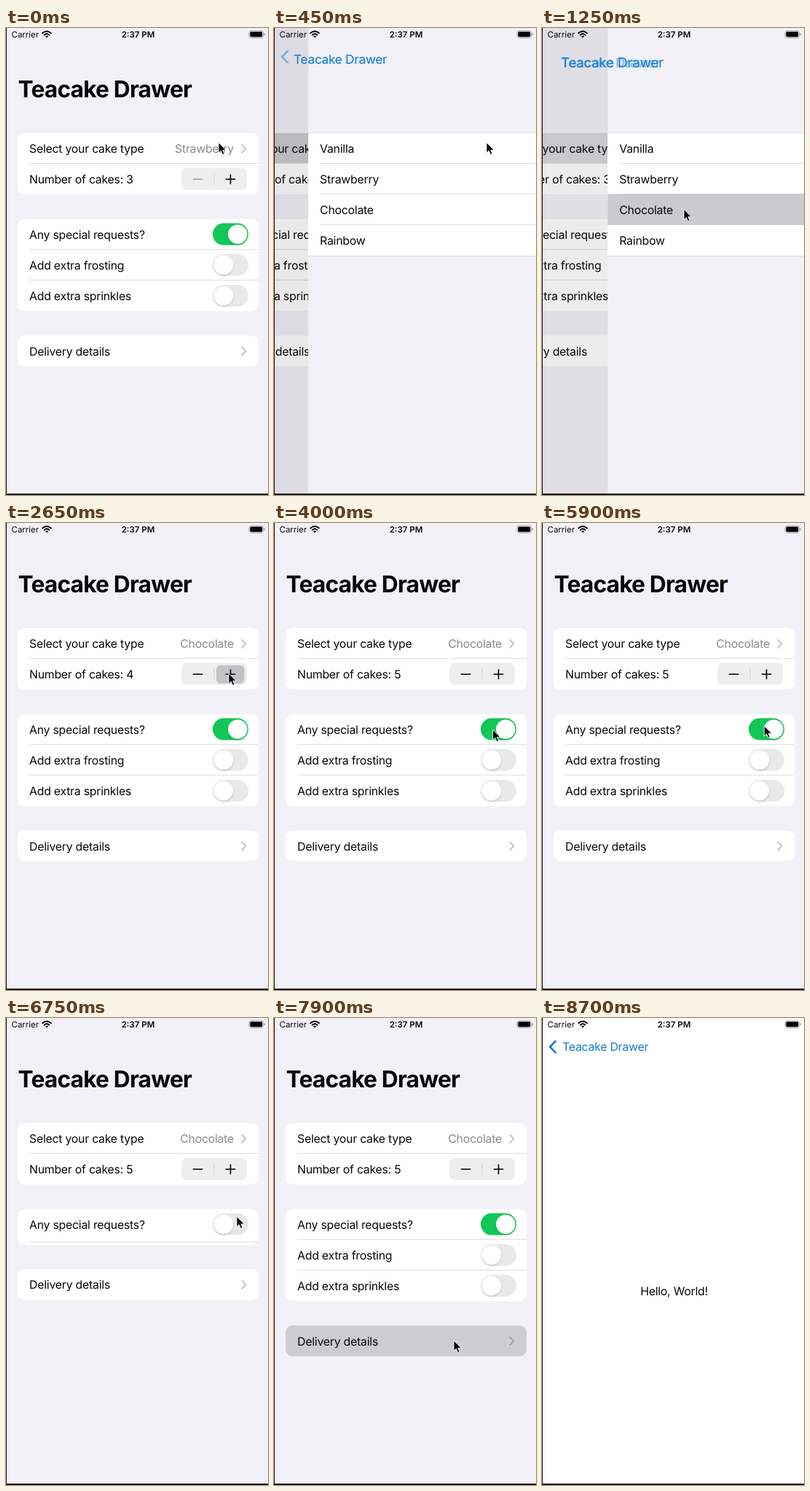
Animation of 360 by 640 pixels, one loop 9.75 s. Source, as an HTML page:

```html
<!DOCTYPE html>
<html lang="en">
<head>
<meta charset="utf-8">
<title>Order form</title>
<style>
  html, body { margin: 0; width: 100%; height: 100%; overflow: hidden; background: #f2f1f7; }
  svg { display: block; width: 360px; height: 640px; }
  text { font: 15.8px Inter, "Liberation Sans", sans-serif; letter-spacing: -.014em; fill: #080808; text-rendering: geometricPrecision; }
  .end { text-anchor: end; fill: #8a8a8e; }
  .mid { text-anchor: middle; }
  .small { font-size: 11.5px; letter-spacing: 0; }
  .clock { font-weight: 600; }
  .blue { fill: #127cd6; }
  .large { font-size: 31.7px; font-weight: 700; letter-spacing: -.025em; }
  .line { stroke: #dfdfe2; }
  .stroke { fill: none; stroke-linecap: round; stroke-linejoin: round; }
</style>
</head>
<body>
<svg id="stage" viewBox="0 0 360 640">
  <defs>
    <clipPath id="card"><rect id="cardClip" x="16" y="304" width="331"/></clipPath>
    <filter id="soft" x="-30%" y="-30%" width="160%" height="170%">
      <feDropShadow dx="0" dy="1.5" stdDeviation="1.3" flood-opacity=".18"/>
    </filter>
  </defs>
  <g id="form"></g>
  <rect id="dim" width="360" height="640"/>
  <g id="list"></g>
  <g id="detail"></g>
  <g id="nav"></g>
  <g id="status"></g>
  <path id="cursor" d="M0 0V14.2L3.3 11.2 5.6 16.5 8 15.5 5.8 10.3H10.4Z" fill="#000" stroke="#fff" stroke-width=".9"/>
</svg>
<script>
const LOOP = 9750, ROW = 42, TITLE = "Teacake Drawer";
const $ = id => document.getElementById(id);
const clamp = v => Math.max(0, Math.min(1, v));
const mix = (a, b, p) => a + (b - a) * p;
const smooth = p => (p = clamp(p), p * p * (3 - 2 * p));
const blend = (from, to, p) => `rgb(${from.map((c, i) => Math.round(mix(c, to[i], p)))})`;

function el(parent, tag, attrs, content) {
  const node = document.createElementNS("http://www.w3.org/2000/svg", tag);
  set(node, attrs);
  if (content) node.textContent = content;
  return parent.appendChild(node);
}
function set(node, attrs) {
  for (const key in attrs) node.setAttribute(key, attrs[key]);
}
const group = (parent, attrs = {}) => el(parent, "g", attrs);
const rect = (p, x, y, width, height, rx, fill) => el(p, "rect", { x, y, width, height, rx, fill });
const label = (p, x, centre, text, cls = "") => el(p, "text", { x, y: centre + 5.7, class: cls }, text);
const line = (p, x1, x2, y) => el(p, "line", { x1, x2, y1: y, y2: y, class: "line" });
const stroke = (p, d, color, width) =>
  el(p, "path", { d, class: "stroke", stroke: color, "stroke-width": width });
const chevron = (p, y) => stroke(p, `M324.2 ${y - 5.4}l5.2 5.4-5.2 5.4`, "rgba(60,60,67,.33)", 1.8);
const move = (node, x, y) => set(node, { transform: `translate(${x} ${y})` });

function toggle(parent, y) {
  const track = rect(parent, 284, y - 15, 49, 30, 15, "#e9e9ea");
  const thumb = rect(parent, 285.5, y - 13.2, 26.4, 26.4, 13.2, "#fff");
  set(thumb, { filter: "url(#soft)" });
  return { track, thumb };
}
function setToggle({ track, thumb }, on, stretch) {
  set(track, { fill: blend([233, 233, 234], [19, 199, 86], on) });
  set(thumb, { x: mix(285.5, 305.1 - stretch, on), width: 26.4 + stretch });
}

// Order form
const form = $("form");
rect(form, 0, 0, 360, 640, 0, "#f2f1f7");
rect(form, 16, 144, 331, 84, 9, "#fff");
const typeHighlight = el(form, "path", { d: "M16 186V153a9 9 0 0 1 9-9H338a9 9 0 0 1 9 9V186Z", fill: "#cdccd0" });
label(form, 32, 165, "Select your cake type");
const cakeType = label(form, 313, 165, "Strawberry", "end");
chevron(form, 165.5);
line(form, 32, 347, 185.5);
const count = label(form, 32, 207, "Number of cakes: 3");
rect(form, 241, 192, 90, 30, 7, "#eeeeef");
rect(form, 285.5, 199, 1, 16, 0, "#d4d4d7");
const plusHighlight = rect(form, 289, 195, 38.5, 25, 6, "#c3c3c7");
const minus = stroke(form, "M257.3 207.3H269.7", "#000", 1.6);
stroke(form, "M302.3 207.3H314.7M308.5 201V213.6", "#000", 1.6);

const requestCard = rect(form, 16, 262, 331, 126, 9, "#fff");
const extras = group(form, { "clip-path": "url(#card)" });
const frosting = group(extras), sprinkles = group(extras);
label(frosting, 32, 325, "Add extra frosting");
toggle(frosting, 324.7);
label(sprinkles, 32, 367, "Add extra sprinkles");
toggle(sprinkles, 367);
const firstLine = line(form, 32, 347, 303.5), secondLine = line(form, 32, 347, 345.5);
label(form, 32, 283, "Any special requests?");
const requestToggle = toggle(form, 282.6);

const delivery = group(form);
const deliveryCard = rect(delivery, 16, 421.5, 331, ROW, 9, "#fff");
label(delivery, 32, 443, "Delivery details");
chevron(delivery, 442.7);

// Cake list
const list = $("list");
rect(list, 0, 0, 360, 640, 0, "#f2f1f7");
rect(list, 0, 143.5, 360, 169, 0, "#fff");
line(list, 0, 360, 143.5);
line(list, 0, 360, 312.5);
[1, 2, 3].forEach(i => line(list, 16, 360, 143.5 + i * ROW));
const pickHighlight = rect(list, 0, 227.5, 360, 42.5, 0, "#cbcace");
["Vanilla", "Strawberry", "Chocolate", "Rainbow"].forEach((name, i) => label(list, 16, 165 + i * ROW, name));
const check = stroke(list, "M332 207.5l4 4.5 7.5-10.5", "#127cd6", 1.9);

// Detail screen
const detail = $("detail");
rect(detail, 0, 0, 360, 640, 0, "#fff");
label(detail, 181.5, 374.5, "Hello, World!", "mid");

// Navigation title and status bar
const backChevron = stroke($("nav"), "M18.6 31.6L11 39.5l7.6 7.9", "#127cd6", 2.6);
const backTitle = el($("nav"), "text", { class: "blue" }, TITLE);
const largeTitle = el($("nav"), "text", { class: "large" }, TITLE);

const status = $("status");
el(status, "text", { x: 7.5, y: 13, class: "small" }, "Carrier");
el(status, "text", { x: 181.5, y: 13, class: "small mid clock" }, "2:37 PM");
stroke(status, "M50.2 7Q56 1.9 61.8 7M52.6 9.6Q56 6.6 59.4 9.6", "#000", 1.9);
el(status, "path", { d: "M53.8 11.3Q56 9.5 58.2 11.3L56 13.6Z" });
set(rect(status, 334, 3.7, 19.6, 9.8, 3, "none"), { stroke: "#9b9b9f", "stroke-width": .9 });
rect(status, 335.3, 5, 17, 7.2, 1.9, "#000");
rect(status, 354.6, 6.9, 1.3, 3.4, .7, "#9b9b9f");
rect(status, 0, 0, 1, 640, 0, "#1c1c1e");
rect(status, 0, 638, 360, 2, 0, "#1c1c1e");

// Motion
const raw = s => 1 - (1 + 10 * s) * Math.exp(-10 * s);
const spring = ms => raw(.75 * clamp(ms / 750)) / raw(.75);
const ease = (t, start) => smooth((t - start) / 370);
const pulse = (t, start, end) => clamp((t - start) / 50) * clamp((end - t) / 130);
const expansion = t => 1 - ease(t, 4430) + ease(t, 5240) - ease(t, 6445) + ease(t, 7080);

const cursorPath = [
  [0, 292, 157], [500, 292, 157], [950, 195, 248.5], [1350, 195, 248.5], [2050, 284, 208],
  [2250, 306, 206], [3300, 306, 206], [3600, 281, 246], [3850, 296, 291], [4100, 303, 279],
  [5800, 303, 279], [6200, 317, 272], [7300, 317, 272], [7750, 247, 442], [8250, 247, 442],
  [8650, 372, 520], [LOOP, 372, 520]
];
function placeCursor(t) {
  const i = cursorPath.findIndex(key => key[0] > t);
  const [t0, x0, y0] = cursorPath[i - 1], [t1, x1, y1] = cursorPath[i];
  const p = smooth((t - t0) / (t1 - t0));
  move($("cursor"), mix(x0, x1, p), mix(y0, y1, p));
}

function drawTitle(pushed) {
  const q = (1 - pushed) ** 1.25, ratio = 2.08;
  const dark = smooth((q - .2) / .6);
  const place = `translate(${mix(28, 16.5, q)} ${mix(45.2, 95, q)})`;
  const size = mix(1, ratio, q);
  set(backTitle, { transform: `${place} scale(${size})`, opacity: 1 - dark });
  set(largeTitle, { transform: `${place} scale(${size / ratio})`, opacity: smooth(q / .4) });
  largeTitle.style.fill = blend([18, 124, 214], [8, 8, 8], dark);
  set(backChevron, { opacity: clamp(1 - 4 * (1 - pushed)) });
}

function drawRequests(t) {
  const open = expansion(t), closed = 1 - open, fade = open * open;
  const stretch = [4300, 5050, 6300, 6960].reduce((sum, at) => sum + 5 * Math.sin(Math.PI * clamp((t - at) / 350)), 0);
  set(requestCard, { height: ROW + 84 * open });
  set($("cardClip"), { height: 84 * open });
  move(frosting, 0, -ROW * closed);
  move(sprinkles, 0, -84 * closed);
  set(extras, { opacity: fade });
  set(firstLine, { opacity: fade });
  move(secondLine, 0, -ROW * closed);
  set(secondLine, { opacity: open > .001 ? 1 : 0 });
  move(delivery, 0, -84 * closed);
  setToggle(requestToggle, expansion(t + 40), stretch);
}

function draw(t) {
  const listIn = spring(t - 100) - spring(t - 1155), detailIn = spring(t - 7950);
  const pushed = Math.max(listIn, detailIn);
  move(form, -108 * pushed, 0);
  set($("dim"), { opacity: .1 * pushed });
  move(list, 360 * (1 - listIn), 0);
  move(detail, 360 * (1 - detailIn), 0);
  set(list, { visibility: listIn > 0 ? "visible" : "hidden" });
  set(detail, { visibility: detailIn > 0 ? "visible" : "hidden" });
  drawTitle(pushed);

  const picked = t >= 1100, cakes = t < 2450 ? 3 : t < 3000 ? 4 : 5;
  set(typeHighlight, { opacity: t < 50 ? 0 : picked ? listIn : 1 });
  set(pickHighlight, { opacity: picked ? 1 : 0 });
  move(check, 0, picked ? ROW : 0);
  cakeType.textContent = picked ? "Chocolate" : "Strawberry";
  count.textContent = "Number of cakes: " + cakes;
  set(minus, { stroke: cakes > 3 ? "#000" : "#9b9b9d" });
  set(plusHighlight, { opacity: pulse(t, 2410, 2820) + pulse(t, 2960, 3170) });
  set(deliveryCard, { fill: t >= 7900 ? "#cdccd0" : "#fff" });
  drawRequests(t);
  placeCursor(t);
}

const start = performance.now();
function tick() {
  draw((performance.now() - start) % LOOP);
  requestAnimationFrame(tick);
}
tick();
</script>
</body>
</html>
```
